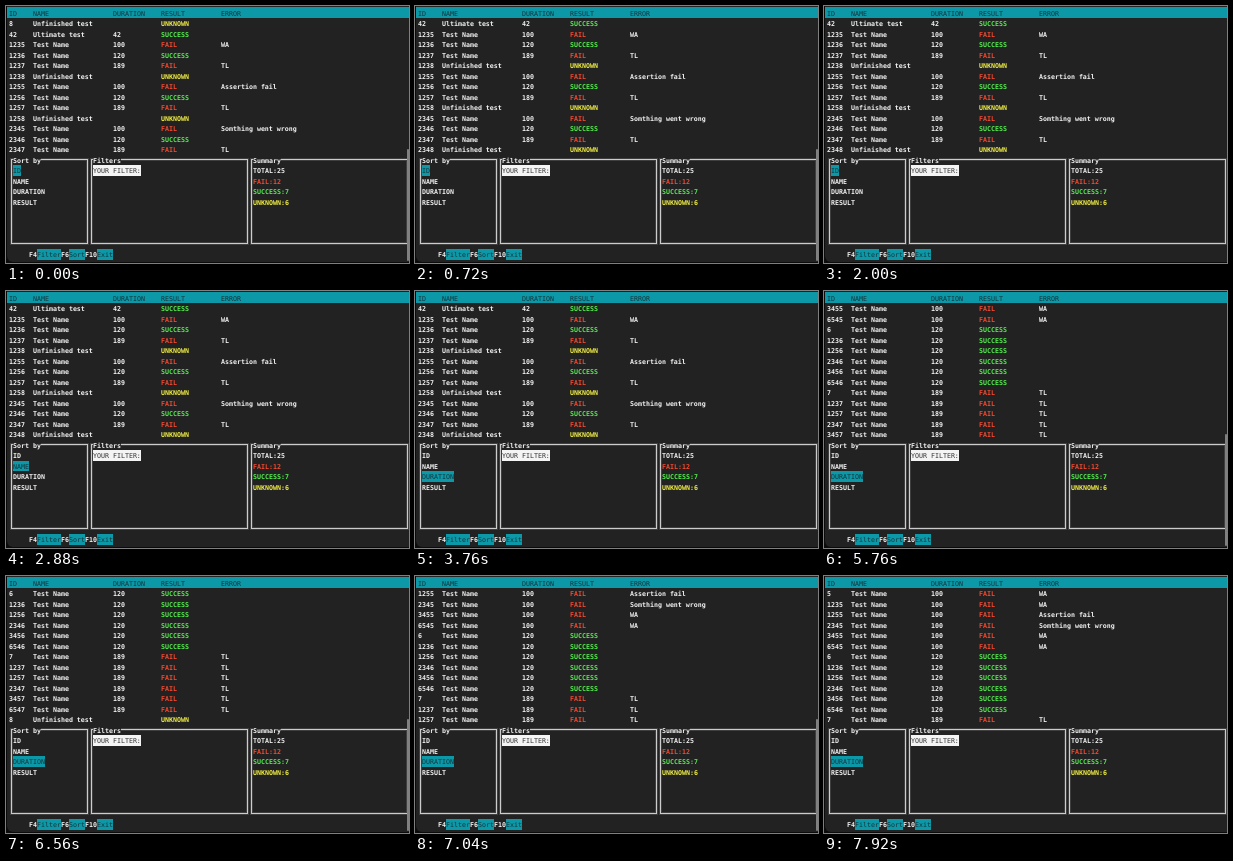
Recreate the animation shown at these times as an HTML page. Size 403 by 257 pixels, loop 8 s.

```html
<!DOCTYPE html>
<html lang="en">
<head>
<meta charset="utf-8">
<title>Test results</title>
<style>
  html, body { margin: 0; width: 100%; height: 100%; overflow: hidden; background: #0b0b0b; }
  #term {
    position: absolute; left: 1px; top: 0; width: 402px; height: 256px;
    background: #222; border-radius: 0 0 0 6px; overflow: hidden;
  }
  #screen {
    position: absolute; left: 0; top: 0; width: 403px; height: 257px; overflow: hidden;
    font: bold 6.645px/12px "DejaVu Sans Mono", "Liberation Mono", monospace;
    text-rendering: geometricPrecision;
    color: #f2f2f2; white-space: pre;
  }
  #screen span, #screen div { position: absolute; }
  #screen .bar, #screen .hl { background: #0d98a8; color: #12343a; font-weight: normal; }
  #screen .bar { left: 1px; top: 1px; width: 402px; height: 11px; }
  .head { color: #12343a; font-weight: normal; }
  .input { background: #f4f4f4; color: #333; font-weight: normal; }
  .title { background: #222; }
  .FAIL { color: #f4492f; }
  .SUCCESS { color: #52ee4c; }
  .UNKNOWN { color: #f1ee45; }
  .box {
    box-sizing: border-box; border: 1px solid #ccc; top: 153px; height: 85px;
    box-shadow: 0 0 0 1px #fff2, inset 0 0 0 1px #fff2;
  }
  #view { left: 0; top: 12px; width: 403px; height: 137px; overflow: hidden; }
  .list { left: 0; width: 403px; }
  #thumb {
    left: 401px; top: 143px; width: 2px; height: 112px; border-radius: 1px;
    background: #808080; animation: thumb 8s step-end infinite;
  }

  #byId { animation: idScroll 8s step-end infinite; }
  #byDuration { animation: durationScroll 8s step-end infinite; }
  #pickID { animation: pickId 8s step-end infinite; }
  #pickNAME { animation: pickName 8s step-end infinite; }
  #pickDURATION { animation: pickDuration 8s step-end infinite; }

  /* one list line is 10.5px */
  @keyframes idScroll {
    0% { top: -31.5px; visibility: visible; }
    5% { top: -42px; visibility: visible; }
    55%, 100% { top: -42px; visibility: hidden; }
  }
  @keyframes durationScroll {
    0% { top: -42px; visibility: hidden; }
    55% { top: -42px; visibility: visible; }
    69% { top: -52.5px; }
    75% { top: -63px; }
    78% { top: -73.5px; }
    84% { top: -63px; }
    85% { top: -52.5px; }
    87% { top: -42px; }
    88% { top: -31.5px; }
    89% { top: -21px; }
    91%, 100% { top: -10.5px; visibility: visible; }
  }
  @keyframes pickId { 0% { visibility: visible; } 32%, 100% { visibility: hidden; } }
  @keyframes pickName {
    0% { visibility: hidden; } 32% { visibility: visible; } 37%, 100% { visibility: hidden; }
  }
  @keyframes pickDuration { 0% { visibility: hidden; } 37%, 100% { visibility: visible; } }
  @keyframes thumb {
    0% { visibility: visible; } 16% { visibility: hidden; }
    65% { visibility: visible; } 97%, 100% { visibility: hidden; }
  }
</style>
</head>
<body>
<div id="term"></div>
<div id="screen">
  <div class="bar"></div>
  <div id="view">
    <div class="list" id="byId"></div>
    <div class="list" id="byDuration"></div>
  </div>
  <div class="box" style="left:5px;width:77px"></div>
  <div class="box" style="left:85px;width:157px"></div>
  <div class="box" style="left:245px;width:157px"></div>
  <div id="thumb"></div>
</div>
<script>
const CELL = 4, LINE = 10.5, LEFT = 3;
const screen_ = document.getElementById('screen');

function put(parent, top, col, text, cls = '', id = '') {
  const s = document.createElement('span');
  s.textContent = text;
  s.className = cls;
  if (id) s.id = id;
  s.style.left = LEFT + col * CELL + 'px';
  s.style.top = top + 'px';
  s.style.width = text.length * CELL + 'px';
  s.style.height = LINE + 'px';
  parent.appendChild(s);
}
const at = (row, col, text, cls, id) => put(screen_, 1.5 + row * LINE, col, text, cls, id);

// Each group of ids holds a failing, a passing, a slow and an unfinished test.
const kinds = [
  ['Test Name', 100, 'FAIL', 'WA'],
  ['Test Name', 120, 'SUCCESS', ''],
  ['Test Name', 189, 'FAIL', 'TL'],
  ['Unfinished test', '', 'UNKNOWN', '']
];
const notes = { 1255: 'Assertion fail', 2345: 'Somthing went wrong' };
const tests = [[42, 'Ultimate test', 42, 'SUCCESS', '']];
for (const first of [5, 1235, 1255, 2345, 3455, 6545])
  kinds.forEach(([name, time, result, error], i) =>
    tests.push([first + i, name, time, result, notes[first + i] || error]));

const cols = [0, 6, 26, 38, 53];
function fill(id, compare) {
  const list = document.getElementById(id);
  [...tests].sort(compare).forEach((test, row) =>
    test.forEach((value, i) => {
      if (value !== '') put(list, row * LINE, cols[i], String(value), i === 3 ? value : '');
    }));
}
const time = test => test[2] || Infinity;
fill('byId', (a, b) => a[0] - b[0]);
fill('byDuration', (a, b) => time(a) === time(b) ? a[0] - b[0] : time(a) - time(b));

['ID', 'NAME', 'DURATION', 'RESULT', 'ERROR'].forEach((h, i) => at(0, cols[i], h, 'head'));

at(14, 1, 'Sort by', 'title');
at(14, 21, 'Filters', 'title');
at(14, 61, 'Summary', 'title');

['ID', 'NAME', 'DURATION', 'RESULT'].forEach((key, i) => {
  at(15 + i, 1, key);
  if (i < 3) at(15 + i, 1, key, 'hl', 'pick' + key);
});
at(15, 21, 'YOUR FILTER:', 'input');

const count = result => tests.filter(t => t[3] === result).length;
at(15, 61, 'TOTAL:' + tests.length);
['FAIL', 'SUCCESS', 'UNKNOWN'].forEach((r, i) => at(16 + i, 61, r + ':' + count(r), r));

let col = 5;
for (const [key, label] of [['F4', 'Filter'], ['F6', 'Sort'], ['F10', 'Exit']]) {
  at(23, col, key);
  at(23, col + key.length, label, 'hl');
  col += key.length + label.length;
}
</script>
</body>
</html>
```
